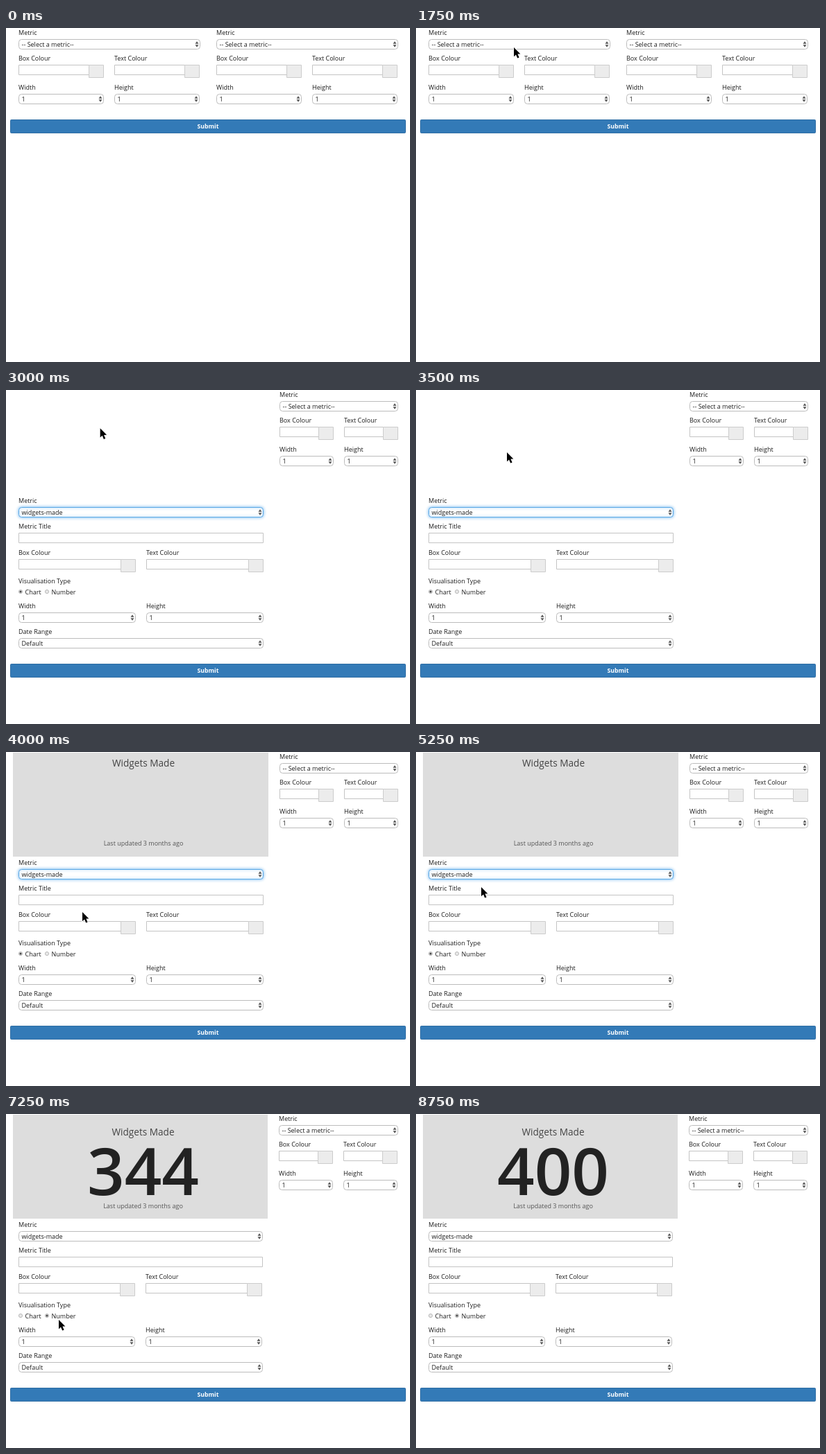
An HTML page with a canvas that plays this animation: 582x482 px, repeating every 10000 ms.

```html
<!DOCTYPE html>
<html lang="en">
<head>
<meta charset="utf-8">
<title>Widget form</title>
<style>
html, body { margin: 0; width: 100%; height: 100%; overflow: hidden; background: #fff; }
canvas { display: block; }
</style>
</head>
<body>
<canvas id="stage" width="582" height="482"></canvas>
<script>
const ctx = document.getElementById('stage').getContext('2d');
const LOOP = 10000, STEP = 250;
const SANS = '"Open Sans", sans-serif';
const MENU = ['-- Select a metric--', 'widgets-made', 'widgets-sold', 'widgets-sold-2'];

// Pointer waypoints: time, x, y
const PATH = [
  [250, 270, 1], [1250, 152, 28], [1500, 152, 28], [1750, 141, 28],
  [2000, 141, 28], [2500, 138, 38], [2750, 138, 38], [3500, 131, 90],
  [4000, 110, 231], [4750, 91, 180], [5250, 94, 195], [5750, 117, 250],
  [6250, 74, 303], [6500, 76, 297], [8250, 76, 297], [8500, 108, 286]
];

function pointerAt(t) {
  const i = PATH.findIndex(p => p[0] >= t);
  if (i < 0 || t < PATH[0][0]) return null;
  const b = PATH[i], a = PATH[Math.max(0, i - 1)];
  const k = (t - a[0]) / (b[0] - a[0] || 1);
  return [a[1] + (b[1] - a[1]) * k, a[2] + (b[2] - a[2]) * k];
}

function text(s, x, y, font = '9px ' + SANS, color = '#1c1c1c', align = 'left') {
  ctx.font = font;
  ctx.fillStyle = color;
  ctx.textAlign = align;
  ctx.fillText(s, x, y);
}

function box(x, y, w, h, r, fill, stroke) {
  ctx.beginPath();
  ctx.roundRect(x + .5, y + .5, w - 1, h - 1, r);
  ctx.fillStyle = fill;
  ctx.fill();
  ctx.strokeStyle = stroke;
  ctx.lineWidth = 1;
  ctx.stroke();
}

function shape(points, fill) {
  ctx.beginPath();
  points.forEach(([x, y]) => ctx.lineTo(x, y));
  ctx.closePath();
  ctx.fillStyle = fill;
  ctx.fill();
}

function select(label, x, y, w, value, focus) {
  text(label, x, y + 10);
  ctx.save();
  if (focus) {
    ctx.shadowColor = 'rgba(80,165,235,.8)';
    ctx.shadowBlur = 4;
  }
  box(x, y + 16, w, 15, 4, '#fff', focus ? '#5ba9e6' : '#bcbcbc');
  ctx.restore();
  text(value, x + 4.5, y + 27);
  const ax = x + w - 5;
  shape([[ax - 2.5, y + 22.7], [ax, y + 19.2], [ax + 2.5, y + 22.7]], '#555');
  shape([[ax - 2.5, y + 24.3], [ax, y + 27.8], [ax + 2.5, y + 24.3]], '#555');
}

function input(label, x, y, w) {
  text(label, x, y + 10);
  box(x, y + 16, w, 15, 0, '#fff', '#c4c4c4');
}

function colour(label, x, y, w) {
  input(label, x, y, w - 21);
  box(x + w - 22, y + 16, 22, 19, 0, '#ececec', '#ccc');
}

// Calls a field drawer for each of two equal columns
function pair(draw, labels, x, y, w, ...rest) {
  const half = (w - 15) / 2;
  labels.forEach((l, i) =>
    draw(l, x + Math.floor(i * (half + 15)), y, Math.floor(half), ...rest));
}

const colours = (x, y, w) => pair(colour, ['Box Colour', 'Text Colour'], x, y, w);
const sizes = (x, y, w) => pair(select, ['Width', 'Height'], x, y, w, '1');

function shortForm(x, w, focus) {
  select('Metric', x, 0, w, MENU[0], focus);
  colours(x, 37, w);
  sizes(x, 79, w);
}

function radio(label, x, y, on) {
  ctx.beginPath();
  ctx.arc(x, y, 2.6, 0, 7);
  ctx.fillStyle = '#e8e8e8';
  ctx.fill();
  ctx.strokeStyle = '#bbb';
  ctx.lineWidth = 1;
  ctx.stroke();
  if (on) {
    ctx.beginPath();
    ctx.arc(x, y, 1.5, 0, 7);
    ctx.fillStyle = '#444';
    ctx.fill();
  }
  text(label, x + 6.5, y + 4);
}

function longForm(w, focus, number) {
  const x = 18;
  select('Metric', x, 153, w, MENU[1], focus);
  input('Metric Title', x, 190, w);
  colours(x, 228, w);
  text('Visualisation Type', x, 279);
  radio('Chart', 21, 291, !number);
  radio('Number', 59, 291, number);
  sizes(x, 305, w);
  select('Date Range', x, 342, w, 'Default');
}

function panel(w, count) {
  const counting = count !== null, mid = counting ? 197.5 : 198;
  ctx.fillStyle = '#ddd';
  ctx.fillRect(10, 1, w, 150);
  text('Widgets Made', mid, counting ? 31 : 21, '13.6px ' + SANS, '#444', 'center');
  if (counting) text(count, mid, 117, '600 94px ' + SANS, '#222', 'center');
  text('Last updated 3 months ago', mid, counting ? 136 : 135, '9px ' + SANS, '#555', 'center');
}

function submit(y) {
  box(6, y, 570, 20, 1, '#337ab7', '#2e6da4');
  text('Submit', 291, y + 13, 'bold 8.7px ' + SANS, '#fff', 'center');
}

function menu(hover) {
  ctx.save();
  ctx.shadowColor = 'rgba(0,0,0,.4)';
  ctx.shadowBlur = 14;
  ctx.shadowOffsetY = 5;
  box(6, 9, 265, 62, 4, '#ececec', '#c4c4c4');
  ctx.restore();
  ctx.fillStyle = '#3b8ffc';
  ctx.fillRect(7, 14 + hover * 13, 263, 13);
  MENU.forEach((s, i) =>
    text(s, 28, 24 + i * 13, '9.2px Inter, sans-serif', i === hover ? '#fff' : '#1c1c1c'));
  ctx.beginPath();
  ctx.moveTo(13.5, 21.5);
  ctx.lineTo(15.8, 24.3);
  ctx.lineTo(20, 16.5);
  ctx.strokeStyle = hover ? '#1c1c1c' : '#fff';
  ctx.lineWidth = 1.5;
  ctx.stroke();
}

function pointer([x, y]) {
  const arrow = [[0, 0], [0, 13.2], [3, 10.5], [5.2, 15.6], [7.6, 14.6], [5.4, 9.6], [9.4, 9.4]];
  ctx.save();
  ctx.translate(x, y);
  shape(arrow, '#000');
  ctx.strokeStyle = '#fff';
  ctx.lineWidth = 2;
  ctx.stroke();
  shape(arrow, '#000');
  ctx.restore();
}

function draw(t) {
  ctx.fillStyle = '#fff';
  ctx.fillRect(0, 0, 582, 482);
  const at = pointerAt(t);
  const focus = t >= 2000 && t < 6750;
  if (t < 3000) {
    shortForm(18, 262, focus);
    shortForm(303, 262);
    submit(132);
    if (focus) menu(Math.floor((at[1] - 14) / 13));
  } else {
    const counting = t >= 7000, inset = counting ? 1 : 0;
    const progress = (t - 6966) / 1000;
    const count = progress >= 1 ? 400 : Math.round(400 * (1 - 2 ** (-10 * progress)));
    if (t >= 3750) panel(368 - inset, counting ? count : null);
    longForm(353 - inset, focus, t >= 6750);
    shortForm(394 - inset, 171 + inset);
    submit(395);
  }
  if (at) pointer(at);
}

const start = performance.now();
function tick() {
  const t = (performance.now() - start) % LOOP;
  draw(Math.floor(t / STEP) * STEP);
  requestAnimationFrame(tick);
}
tick();
</script>
</body>
</html>
```
